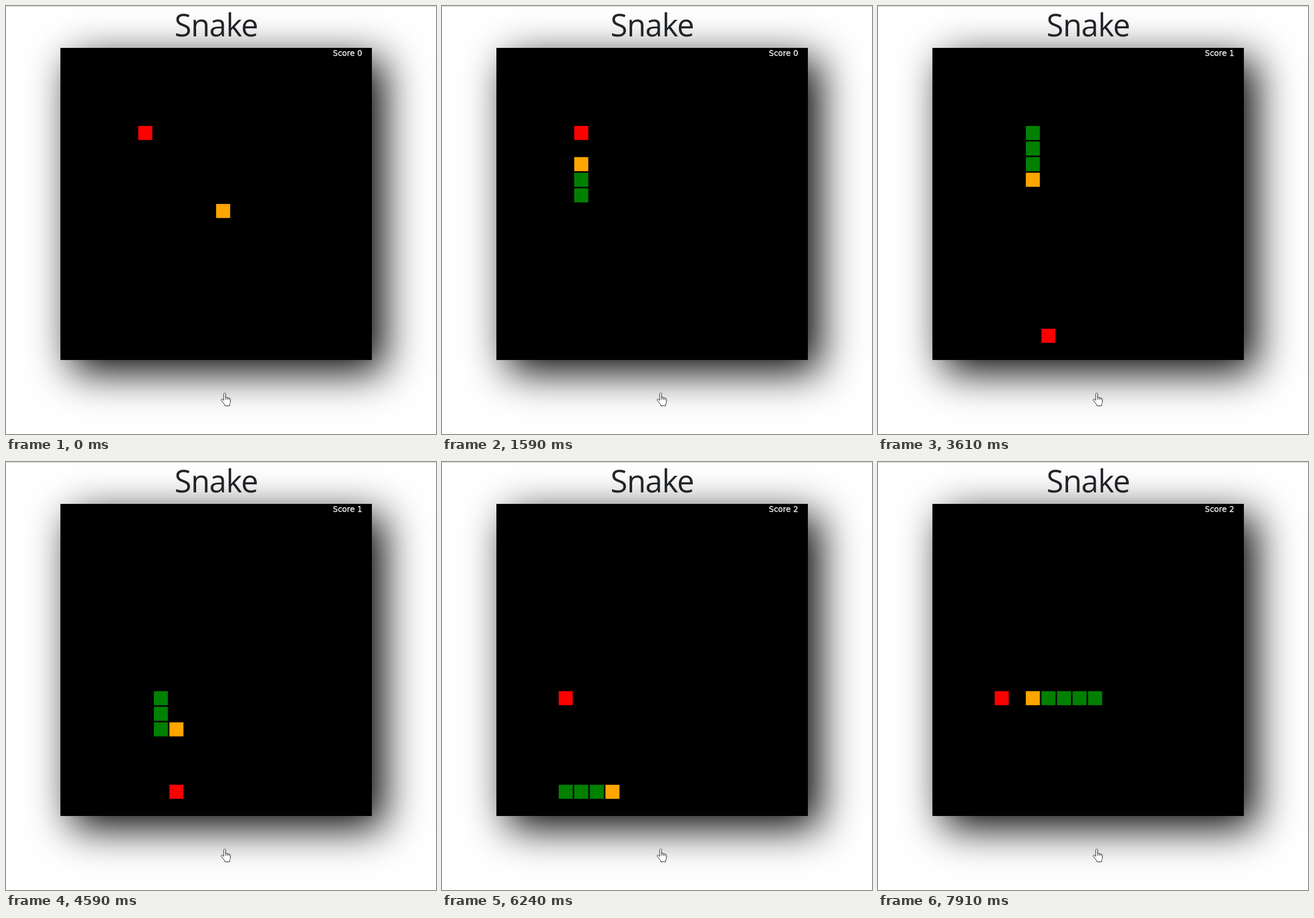
An HTML page that plays this animation: 751 by 746 pixels, repeating every 7990 ms.

```html
<!DOCTYPE html>
<html lang="en">
<head>
<meta charset="utf-8">
<title>Snake</title>
<style>
  html, body { margin: 0; width: 100%; height: 100%; overflow: hidden; background: #fff; }
  .board {
    position: absolute; left: 95px; top: 73px; width: 544px; height: 544px;
    background: #000; box-shadow: 20.4px 20.4px 68px #000;
  }
  svg { position: absolute; left: 0; top: 0; }
  .title { font: 500 54px "Open Sans", "Noto Sans", sans-serif; letter-spacing: -1px; fill: #212529; }
  .score { font: 13.6px "DejaVu Sans", sans-serif; fill: #f4f4f4; stroke: #f4f4f4; stroke-width: .3px; }
</style>
</head>
<body>
<div class="board"></div>
<svg width="751" height="746" viewBox="0 0 751 746">
  <rect width="751" height="1" fill="#c9c9c9"/>
  <text class="title" x="367" y="53" text-anchor="middle">Snake</text>
  <text class="score" id="score" x="571" y="86.6">Score 0</text>
  <g id="cells"></g>
  <path d="M380.3 687.5V676.4c0-2.4 3.3-2.4 3.3 0v6c.5-1.1 2.7-.8 2.9.7c.6-1 2.7-.6 2.9.8c.9-.8 2.6-.1 2.6 1.5v4.6c0 2.4-1.5 3.3-1.5 5.2v1.6h-8.3v-1.6c-1.8-2.1-3.9-4.9-6.2-7.8c-1.2-1.8 1-3.1 2.4-1.7z M383.6 682.4v3.6 M386.5 683.1v3.3 M389.4 683.9v2.9"
        fill="#fff" stroke="#222" stroke-width="1" stroke-linejoin="round"/>
</svg>
<script>
const LOOP = 7990, CELL = 27.2, SIZE = 24.5, LEFT = 95, TOP = 73;
const DIRS = { L: [-1, 0], R: [1, 0], U: [0, -1], D: [0, 1] };
const ROUTE = "L5 U7 R3 D2 L2 D9 R1 D2 L3 D2 R6 U6 L4";
const FOODS = [[5, 5], [7, 18], [4, 12]];

// [move number, ms]; the moves in between are evenly spaced
const BEATS = [[1, 400], [5, 990], [6, 1130], [7, 1330], [8, 1460], [14, 2410], [15, 2530],
  [21, 3470], [22, 3610], [23, 3740], [29, 4590], [30, 4790], [36, 5670], [37, 5850],
  [44, 6770], [45, 6970], [46, 7100], [52, 7910]];

const trail = [[10, 10]];
for (const run of ROUTE.split(" ")) {
  const [dx, dy] = DIRS[run[0]];
  for (let i = 0; i < +run[1]; i++) {
    const [x, y] = trail[trail.length - 1];
    trail.push([x + dx, y + dy]);
  }
}

const times = [0];
BEATS.forEach(([n, t], i) => {
  const [m, s] = i ? BEATS[i - 1] : [0, 0];
  for (let k = m + 1; k <= n; k++) times[k] = s + (t - s) * (k - m) / (n - m);
});

// moves on which each piece of food is eaten
const meals = [];
trail.forEach(([x, y], i) => {
  const food = FOODS[meals.length];
  if (x === food[0] && y === food[1]) meals.push(i);
});

const cells = document.getElementById("cells");
const score = document.getElementById("score");
const rects = Array.from({ length: 6 }, () => {
  const rect = document.createElementNS("http://www.w3.org/2000/svg", "rect");
  rect.setAttribute("width", SIZE);
  rect.setAttribute("height", SIZE);
  return cells.appendChild(rect);
});

function place(rect, [col, row], color) {
  rect.setAttribute("x", LEFT + col * CELL);
  rect.setAttribute("y", TOP + row * CELL);
  rect.setAttribute("fill", color);
}

let shown = -1;
function draw(ms) {
  let step = times.length - 1;
  while (times[step] > ms + 0.01) step--;
  if (step === shown) return;
  shown = step;

  const points = meals.filter(m => m <= step).length;
  const length = 3 + meals.filter(m => m < step).length;
  const [food, ...body] = rects;
  place(food, FOODS[points], "#f00");
  body.forEach((rect, i) => {
    const visible = i < length && i <= step;
    rect.setAttribute("visibility", visible ? "visible" : "hidden");
    if (visible) place(rect, trail[step - i], i ? "#008000" : "#ffa500");
  });
  score.textContent = "Score " + points;
}

const start = performance.now();
function tick() {
  draw((performance.now() - start) % LOOP);
  requestAnimationFrame(tick);
}
tick();
</script>
</body>
</html>
```
